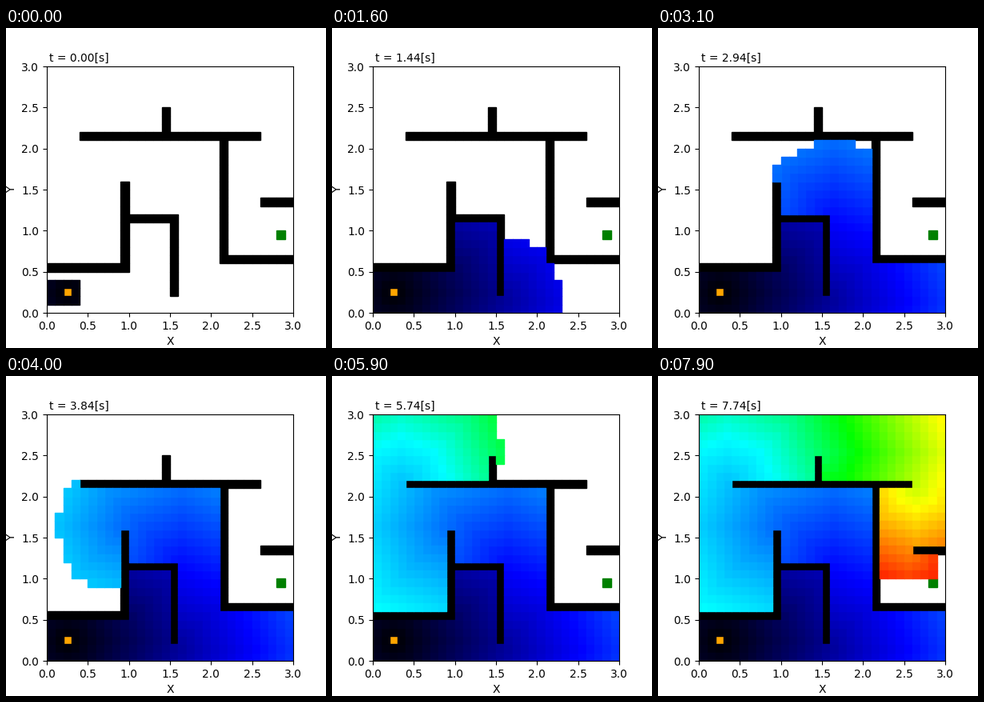
These frames come from a looping animation (400x400 px, 8 s). A matplotlib script:

```python
import itertools
import math

import matplotlib.pyplot as plt
import numpy as np
from matplotlib.animation import FuncAnimation
from matplotlib.collections import PolyCollection
from matplotlib.patches import Rectangle

N, CELL = 30, 0.1
START, GOAL = (2, 2), (28, 9)
FRAMES, INTERVAL = 80, 100

# wall runs: first column, last column, first row, last row
RUNS = [
    (0, 9, 5, 5), (9, 9, 5, 15), (9, 15, 11, 11), (15, 15, 2, 11),
    (4, 25, 21, 21), (14, 14, 22, 24), (21, 21, 6, 20),
    (21, 29, 6, 6), (26, 29, 13, 13),
]
WALLS = {(x, y) for a, b, c, d in RUNS
         for x in range(a, b + 1) for y in range(c, d + 1)}
STEPS = [s for s in itertools.product((-1, 0, 1), repeat=2) if any(s)]

# cost ramp: black, blue, cyan, green, yellow, red
STOPS = np.array([0, 2, 4, 5, 6, 7]) * 11.7
RAMP = np.array([(0, 0, 0), (0, 0, 1), (0, 1, 1),
                 (0, 1, 0), (1, 1, 0), (1, 0, 0)])


def cost_color(cost):
    return [np.interp(cost, STOPS, RAMP[:, c]) for c in range(3)]


def search():
    """Dijkstra on the grid: cells in order of discovery, their costs,
    and how many are known after each expansion."""
    cost, order, known = {START: 0.0}, [], [0]
    queue, done = {START}, set()
    while queue:
        cell = min(queue, key=lambda c: (cost[c], c))
        queue.remove(cell)
        done.add(cell)
        for dx, dy in STEPS:
            n = (cell[0] + dx, cell[1] + dy)
            if n in WALLS or n in done or min(n) < 0 or max(n) >= N:
                continue
            new = round(cost[cell] + math.hypot(dx, dy), 6)
            if n not in cost:
                order.append(n)
                queue.add(n)
            cost[n] = min(new, cost.get(n, math.inf))
        known.append(len(order))
    return order, cost, known


def square(cell):
    x, y = cell[0] * CELL, cell[1] * CELL
    return [(x, y), (x + CELL, y), (x + CELL, y + CELL), (x, y + CELL)]


def add_cell(cell, color):
    ax.add_patch(Rectangle(square(cell)[0], CELL, CELL, color=color))


order, cost, known = search()
squares = [square(c) for c in order]
colors = [cost_color(cost[c]) for c in order]

fig, ax = plt.subplots(figsize=(4, 4), dpi=100)
ax.set_aspect("equal")
ax.set(xlim=(0, 3), ylim=(0, 3), xlabel="X", ylabel="Y")
ticks = np.arange(0, 3.1, 0.5)
ax.set_xticks(ticks)
ax.set_yticks(ticks)

for wall in sorted(WALLS):
    add_cell(wall, "black")
add_cell(START, "orange")
add_cell(GOAL, "green")
visited = PolyCollection([], linewidths=1, zorder=1.5)
ax.add_collection(visited, autolim=False)
clock = ax.text(0.01, 1.02, "", transform=ax.transAxes, fontsize=10)


def update(i):
    tick = 2 * i if i < 2 else 10 * i - 16
    n = known[min(tick + 2, len(known) - 1)]
    visited.set_verts(squares[:n])
    visited.set_facecolor(colors[:n])
    visited.set_edgecolor(colors[:n])
    clock.set_text(f"t = {tick / 100:.2f}[s]")
    return visited, clock


anim = FuncAnimation(fig, update, frames=FRAMES, interval=INTERVAL,
                     init_func=lambda: update(0), repeat=True,
                     repeat_delay=0, blit=False)
plt.show()
```
